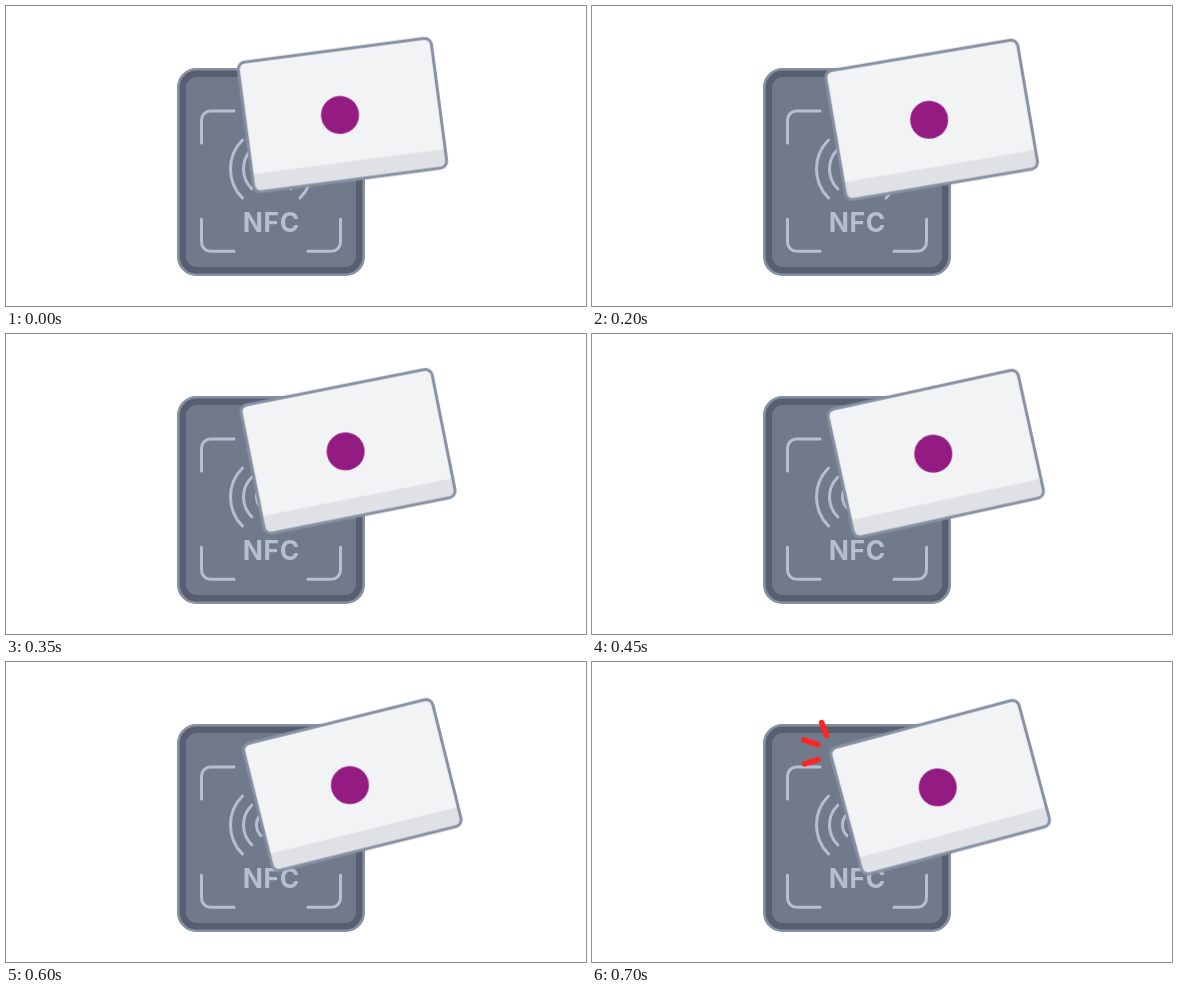
Animation of 580 by 300 pixels, one loop 1 s. Source, as an HTML page:

```html
<!DOCTYPE html>
<html lang="en">
<head>
<meta charset="utf-8">
<title>NFC card tap</title>
<style>
  html, body { margin: 0; width: 100%; height: 100%; overflow: hidden; background: #fff; }
  svg { display: block; width: 580px; height: 300px; }

  .edge { fill: none; stroke: #8590a2; }
  .lines { fill: none; stroke: #b5bfd1; stroke-width: 3; stroke-linecap: round; }
  .label { font: 700 26.5px Inter, Arial, sans-serif; letter-spacing: .6px; fill: #b5bfd1; }

  .card { transform-origin: 465px 28px; animation: tilt 1s infinite; }
  .spark { fill: none; stroke: #ff2426; stroke-width: 5.5; stroke-linecap: round; animation: flash 1s step-end infinite; }

  @keyframes tilt {
    0% { transform: rotate(-7.5deg); animation-timing-function: steps(14, end); }
    70%, 100% { transform: rotate(-15deg); }
  }
  @keyframes flash {
    0% { visibility: hidden; }
    70%, 100% { visibility: visible; }
  }
</style>
</head>
<body>
<svg viewBox="0 0 580 300">
  <defs>
    <clipPath id="face"><rect x="229.7" y="26.2" width="194.7" height="130.8" rx="7"/></clipPath>
    <path id="bracket" d="M195.5 137V114a9 9 0 0 1 9-9H228"/>
    <path id="waves" d="M236.5 134a41 41 0 0 0 0 58M245.7 143.2a28 28 0 0 0 0 39.6M254.9 152.4a15 15 0 0 0 0 21.2"/>
  </defs>

  <!-- reader -->
  <rect x="172.3" y="63.3" width="185.4" height="205.4" rx="18" fill="#565e70"/>
  <rect x="180" y="71" width="170" height="190" rx="11" fill="#717a8a"/>
  <rect class="edge" x="172.3" y="63.3" width="185.4" height="205.4" rx="18" stroke-width="2.6"/>
  <g class="lines">
    <use href="#bracket"/>
    <use href="#bracket" transform="matrix(-1 0 0 1 530 0)"/>
    <use href="#bracket" transform="matrix(1 0 0 -1 0 350.3)"/>
    <use href="#bracket" transform="matrix(-1 0 0 -1 530 350.3)"/>
    <use href="#waves"/>
    <use href="#waves" transform="matrix(-1 0 0 1 530.5 0)"/>
  </g>
  <text class="label" x="236.8" y="226.4">NFC</text>

  <path class="spark" d="M229.6 60.5L234.7 73.8M212 77.9L225.7 82.6M212.6 101.8L226 97.3"/>

  <!-- card -->
  <g class="card">
    <g clip-path="url(#face)">
      <rect x="229" y="26" width="196" height="132" fill="#f2f3f5"/>
      <rect x="229" y="138.5" width="196" height="20" fill="#e0e1e4"/>
    </g>
    <rect class="edge" x="229.7" y="26.2" width="194.7" height="130.8" rx="7" stroke-width="3"/>
    <circle cx="324.6" cy="91.2" r="19" fill="#931b82"/>
  </g>
</svg>
</body>
</html>
```
